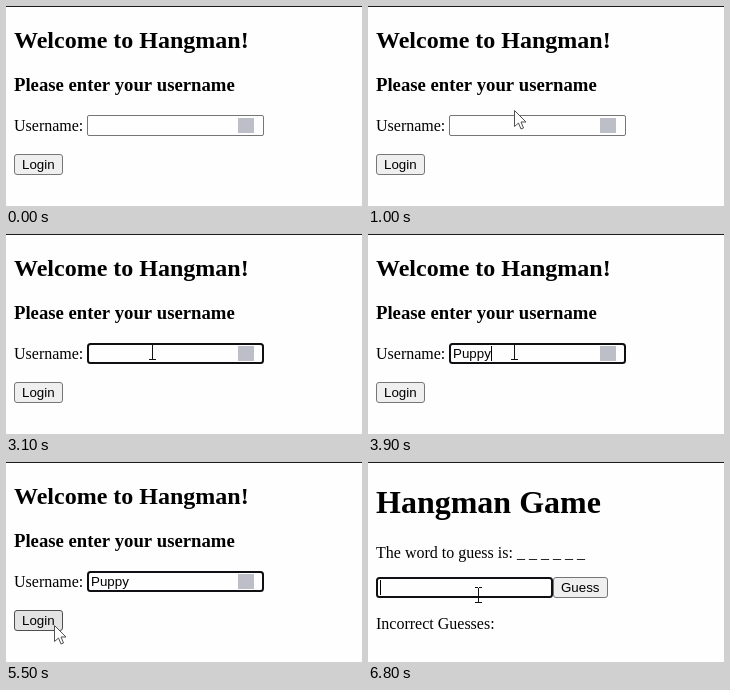
Write an HTML page with a canvas that moves like this. It is 356 px wide and 200 px high and loops after 7000 ms.

```html
<!DOCTYPE html>
<html lang="en">
<head>
<meta charset="utf-8">
<title>Hangman</title>
<style>
  html, body { margin: 0; width: 356px; height: 200px; overflow: hidden; background: #fefefe; }
  canvas { display: block; }
</style>
</head>
<body>
<canvas id="stage" width="356" height="200"></canvas>
<script>
const ctx = document.getElementById('stage').getContext('2d');
const LOOP = 7000, STEP = 100;
const SERIF = '"Liberation Serif", serif';
const SANS = '13.333px "Liberation Sans", sans-serif';
const NAME = 'Puppy';
const KEY_TIMES = [3200, 3500, 3700, 3800, 3900];

// Pointer path: time, x, y
const PATH = [
  [100, 0, 190], [500, 84, 132], [800, 136, 103], [1000, 146, 104], [1300, 146, 118],
  [4900, 146, 118], [5200, 84, 148], [5500, 48, 163],
  [5700, 50, 164], [5900, 50, 164], [6200, 88, 144], [6500, 111, 132], [6800, 110, 133]
];

const NAME_FIELD = { x: 81, y: 109, w: 177, h: 21 };
const LOGIN = { x: 8, y: 148, w: 49, h: 21 };
const GUESS_FIELD = { x: 8, y: 115, w: 177, h: 21 };
const GUESS = { x: 185, y: 115, w: 55, h: 21 };
const LABEL = { x: 8, y: 110, w: 69, h: 18 };
const MISSES = { x: 8, y: 152, w: 119, h: 18 };

const inside = (p, r) => p.x >= r.x && p.x < r.x + r.w && p.y >= r.y && p.y < r.y + r.h;

function text(str, x, y, font) {
  ctx.font = font;
  ctx.fillStyle = '#000';
  ctx.fillText(str, x, y);
}

function box(r, fill, stroke, line, radius) {
  ctx.beginPath();
  ctx.roundRect(r.x + line / 2, r.y + line / 2, r.w - line, r.h - line, radius);
  ctx.fillStyle = fill;
  ctx.fill();
  ctx.lineWidth = line;
  ctx.strokeStyle = stroke;
  ctx.stroke();
}

function field(r, focused) {
  box(r, '#fefefe', focused ? '#101014' : '#767676', focused ? 2 : 1, focused ? 2.5 : 1.5);
}

function button(r, label, hover) {
  box(r, hover ? '#e3e3e3' : '#efefef', hover ? '#4f4f4f' : '#767676', 1, 2.5);
  text(label, r.x + 8, r.y + 15, SANS);
}

function caret(x, y) {
  ctx.fillStyle = '#000';
  ctx.fillRect(Math.round(x), y, 1, 15);
}

function pointerAt(t) {
  if (t < PATH[0][0]) return null;
  let i = PATH.findIndex(k => k[0] > t);
  if (i < 0) i = PATH.length;
  const [t0, x0, y0] = PATH[i - 1];
  const [t1, x1, y1] = PATH[i] || [t0 + 1, x0, y0];
  const u = (t - t0) / (t1 - t0);
  return { x: Math.round(x0 + (x1 - x0) * u), y: Math.round(y0 + (y1 - y0) * u) };
}

function arrow({ x, y }) {
  const pts = [[0, 0], [0, 16], [4, 12.5], [6.5, 18.5], [9, 17.5], [6.5, 11.5], [11.5, 11.5]];
  ctx.beginPath();
  pts.forEach(([dx, dy]) => ctx.lineTo(x + dx + 0.5, y + dy + 0.5));
  ctx.closePath();
  ctx.fillStyle = '#fff';
  ctx.fill();
  ctx.lineWidth = 1;
  ctx.strokeStyle = '#505050';
  ctx.stroke();
}

function beam({ x, y }) {
  ctx.fillStyle = '#111';
  ctx.fillRect(x, y - 7, 1, 15);
  for (const edge of [y - 8, y + 7]) {
    ctx.fillRect(x - 3, edge, 3, 1);
    ctx.fillRect(x + 1, edge, 3, 1);
  }
}

function loginPage(t, pointer) {
  const focused = t >= 1500;
  const typed = NAME.slice(0, KEY_TIMES.filter(k => k <= t).length);
  text('Welcome to Hangman!', 8, 42, `bold 24px ${SERIF}`);
  text('Please enter your username', 8, 85, `bold 18.72px ${SERIF}`);
  text('Username:', 8, 125, `16px ${SERIF}`);
  field(NAME_FIELD, focused);
  ctx.fillStyle = '#bcbec8';
  ctx.fillRect(232, 112, 16, 15);
  text(typed, 85, 124, SANS);
  const blinkOn = t < 3200
    ? t < 2000 || (t >= 2500 && t < 3100)
    : t < 4400 || (t >= 4900 && t < 5400);
  if (focused && blinkOn) caret(85 + ctx.measureText(typed).width, 112);
  button(LOGIN, 'Login', pointer && inside(pointer, LOGIN));
}

function gamePage(t) {
  const focused = t >= 6500;
  text('Hangman Game', 8, 51, `bold 32px ${SERIF}`);
  text('The word to guess is:' + (t >= 6000 ? ' _ _ _ _ _ _' : ''), 8, 96, `16px ${SERIF}`);
  field(GUESS_FIELD, focused);
  if (focused) caret(12, 118);
  button(GUESS, 'Guess', false);
  text('Incorrect Guesses:', 8, 167, `16px ${SERIF}`);
}

function draw(t) {
  const pointer = pointerAt(t);
  const inGame = t >= 5700;
  ctx.fillStyle = '#fefefe';
  ctx.fillRect(0, 0, 356, 200);
  ctx.fillStyle = '#1c1c20';
  ctx.fillRect(0, 0, 356, 1);
  if (inGame) gamePage(t);
  else loginPage(t, pointer);
  if (!pointer) return;
  const textAreas = inGame ? [GUESS_FIELD, MISSES] : [NAME_FIELD, LABEL];
  if (textAreas.some(r => inside(pointer, r))) beam(pointer);
  else arrow(pointer);
}

function frame() {
  const t = performance.now() % LOOP;
  draw(Math.floor(t / STEP) * STEP);
  requestAnimationFrame(frame);
}
frame();
</script>
</body>
</html>
```
